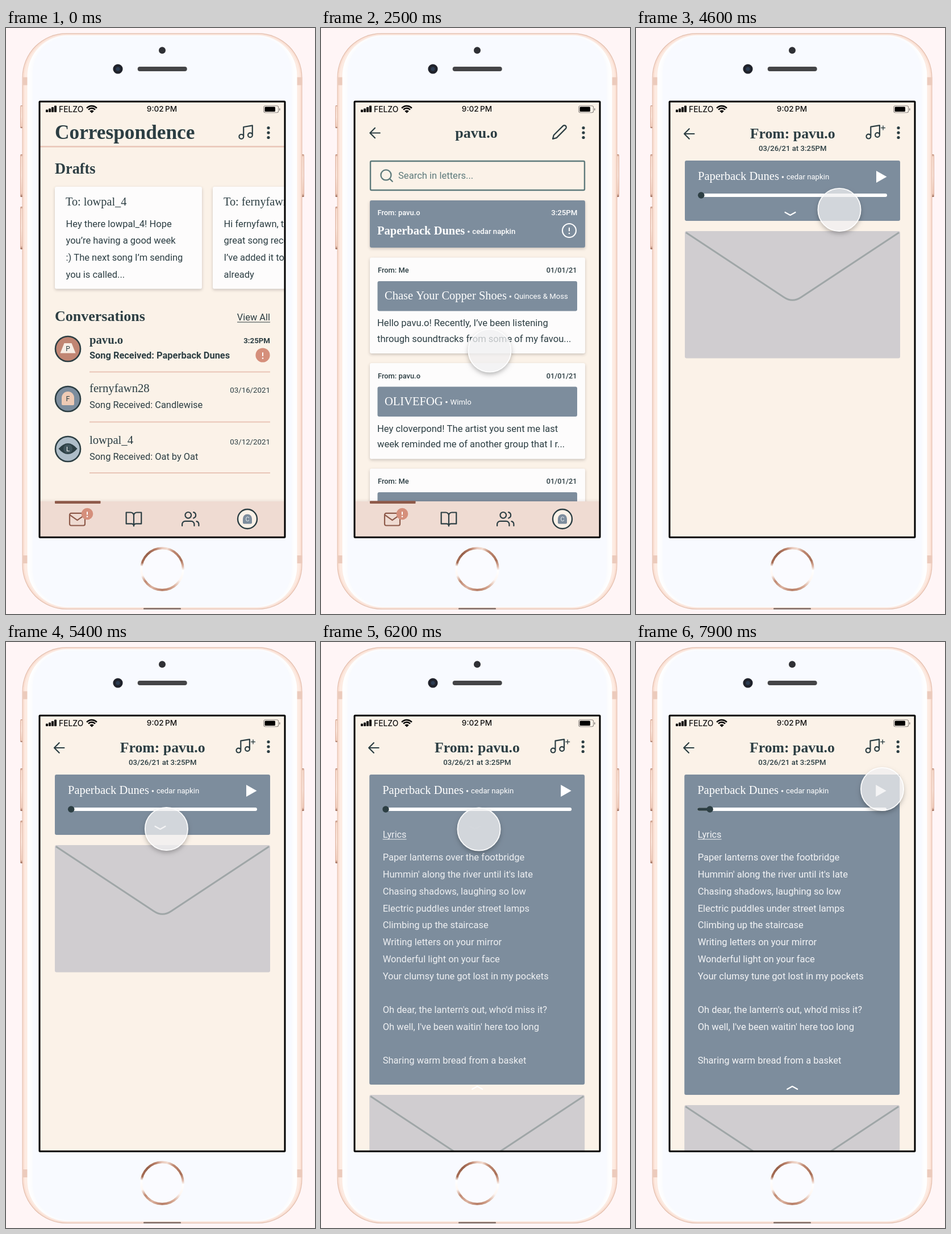
An HTML page with a canvas that plays this animation: 544x1030 px, repeating every 8 s.

```html
<!DOCTYPE html>
<html lang="en">
<head>
<meta charset="utf-8">
<title>Letters prototype</title>
<style>
html, body { margin: 0; width: 100%; height: 100%; overflow: hidden; background: #fff5f6; }
canvas { display: block; width: 544px; height: 1030px; }
</style>
</head>
<body>
<canvas id="stage"></canvas>
<script>
const W = 544, H = 1030, LOOP = 8000, STEP = 100;
const INK = '#2c3e43', CREAM = '#fbf2e8', BLUE = '#7d8d9d', PAPER = '#fdfcfc',
      BLUSH = '#e9c5b7', CORAL = '#d58f7b', BROWN = '#8e5a4a', TEAL = '#5e7a7b', MIST = '#f3f4f6';
const SERIF = '"Liberation Serif", serif', SANS = 'Roboto, sans-serif', UI = 'Inter, sans-serif';
const SONG = 'Paperback Dunes', BAND = 'cedar napkin', FRIEND = 'pavu.o';
const LYRICS = [
  'Paper lanterns over the footbridge',
  "Hummin' along the river until it's late",
  'Chasing shadows, laughing so low',
  'Electric puddles under street lamps',
  'Climbing up the staircase',
  'Writing letters on your mirror',
  'Wonderful light on your face',
  'Your clumsy tune got lost in my pockets',
  '',
  "Oh dear, the lantern's out, who'd miss it?",
  "Oh well, I've been waitin' here too long",
  '',
  'Sharing warm bread from a basket'
];
const ICONS = {
  music: 'M9 18V5l12-2v13M9 18a3 3 0 1 1-6 0a3 3 0 1 1 6 0M21 16a3 3 0 1 1-6 0a3 3 0 1 1 6 0',
  pencil: 'M17 3a2.828 2.828 0 1 1 4 4L7.5 20.5 2 22l1.5-5.5z',
  back: 'M19 12H5M12 19l-7-7 7-7',
  search: 'M19 11a8 8 0 1 1-16 0a8 8 0 1 1 16 0M21 21l-4.35-4.35',
  mail: 'M4 4h16a2 2 0 0 1 2 2v12a2 2 0 0 1-2 2H4a2 2 0 0 1-2-2V6a2 2 0 0 1 2-2zM22 6l-10 7L2 6',
  book: 'M2 3h6a4 4 0 0 1 4 4v14a3 3 0 0 0-3-3H2zM22 3h-6a4 4 0 0 0-4 4v14a3 3 0 0 1 3-3h7z',
  users: 'M17 21v-2a4 4 0 0 0-4-4H5a4 4 0 0 0-4 4v2M23 21v-2a4 4 0 0 0-3-3.87' +
         'M16 3.13a4 4 0 0 1 0 7.75M13 7a4 4 0 1 1-8 0a4 4 0 1 1 8 0'
};

const dpr = window.devicePixelRatio || 1;
function makeLayer(canvas) {
  canvas.width = W * dpr;
  canvas.height = H * dpr;
  const c = canvas.getContext('2d');
  c.scale(dpr, dpr);
  return c;
}
const main = makeLayer(document.getElementById('stage'));
const layer = makeLayer(document.createElement('canvas'));
let g = main;

const clamp = v => Math.max(0, Math.min(1, v));
const span = (t, from, to) => clamp((t - from) / (to - from));
const easeOut = p => Math.sin(p * Math.PI / 2);
const easeInOut = p => p * p * (3 - 2 * p);
const mix = (a, b, p) => a + (b - a) * p;

function text(s, x, y, size, color = INK, weight = 400, font = SANS, align = 'left') {
  g.font = `${weight} ${size}px ${font}`;
  g.fillStyle = color;
  g.textAlign = align;
  g.fillText(s, x, y);
  return g.measureText(s).width;
}
function box(x, y, w, h, r, fill) {
  g.beginPath();
  g.roundRect(x, y, w, h, r);
  g.fillStyle = fill;
  g.fill();
}
function card(x, y, w, h, fill) {
  g.save();
  g.shadowColor = 'rgba(60,50,50,.25)';
  g.shadowBlur = 5 * dpr;
  g.shadowOffsetY = 2 * dpr;
  box(x, y, w, h, 3, fill);
  g.restore();
}
function disc(x, y, r, fill, stroke, width) {
  g.beginPath();
  g.arc(x, y, r, 0, 7);
  if (fill) { g.fillStyle = fill; g.fill(); }
  if (stroke) { g.strokeStyle = stroke; g.lineWidth = width; g.stroke(); }
}
function line(points, color, width) {
  g.beginPath();
  points.forEach(([x, y]) => g.lineTo(x, y));
  g.strokeStyle = color;
  g.lineWidth = width;
  g.stroke();
}
function shape(d, fill) {
  g.fillStyle = fill;
  g.fill(new Path2D(d));
}
function icon(name, x, y, scale, color = INK, width = 2.2) {
  g.save();
  g.translate(x, y);
  g.scale(scale, scale);
  g.lineWidth = width / scale;
  g.lineCap = g.lineJoin = 'round';
  g.strokeStyle = color;
  g.stroke(new Path2D(ICONS[name]));
  g.restore();
}
function kebab(x) {
  [175.5, 184, 192.5].forEach(y => disc(x, y, 2.6, INK));
}
function bang(x, y, h) {
  box(x - 1, y - h, 2, h * 1.15, 1, '#fff');
  disc(x, y + h * .75, 1.3, '#fff');
}
function chevron(x, y, dir) {
  g.beginPath();
  g.moveTo(x - 9, y - 2.5 * dir);
  g.lineTo(x, y + 2.5 * dir);
  g.lineTo(x + 9, y - 2.5 * dir);
  g.strokeStyle = '#fff';
  g.lineWidth = 2.2;
  g.lineCap = g.lineJoin = 'round';
  g.stroke();
  g.lineCap = 'butt';
}
function track(title, artist, x, y, weight) {
  const end = x + text(title, x, y, 20.5, '#fff', weight, SERIF);
  disc(end + 6.5, y - 5, 1.8, '#fff');
  text(artist, end + 13, y - 1, 13.2, '#fff', weight === 700 ? 500 : 400);
}
function arch(x, y, w, h, fill) {
  box(x - w / 2, y - h / 2, w, h, [w / 2, w / 2, 2, 2], fill);
}

function statusBar() {
  [4.5, 6.5, 9, 11.5].forEach((h, i) => box(70 + i * 5, 148 - h, 4, h, 1, '#000'));
  text('FELZO', 93, 147.5, 13.8, '#111', 500, UI);
  g.strokeStyle = '#000';
  g.lineWidth = 2.6;
  [12, 8].forEach(r => {
    g.beginPath();
    g.arc(151, 149, r, -2.4, -.74);
    g.stroke();
  });
  g.beginPath();
  g.moveTo(151, 149.5);
  g.arc(151, 149.5, 5, -2.4, -.74);
  g.fillStyle = '#000';
  g.fill();
  text('9:02\u2009PM', 274.5, 147.3, 13.6, '#111', 500, UI, 'center');
  g.beginPath();
  g.roundRect(453.7, 136.7, 26, 12, 3);
  g.strokeStyle = '#8f8a86';
  g.lineWidth = 1.1;
  g.stroke();
  box(455.5, 138.5, 18.5, 8.5, 1.5, '#000');
  box(481, 141, 1.6, 4, 1, '#8f8a86');
}

function navBar() {
  g.save();
  g.shadowColor = 'rgba(90,60,50,.15)';
  g.shadowBlur = 6 * dpr;
  box(59, 832, 433, 64, 0, '#efdbd2');
  g.restore();
  box(86, 831.3, 80.5, 4.6, 1, BROWN);
  icon('mail', 109.3, 847.5, 1.35, BROWN);
  disc(143, 854, 10.3, CORAL);
  bang(143, 855, 5);
  icon('book', 209, 847.5, 1.33);
  icon('users', 308.8, 847, 1.33);
  disc(425, 863, 17, CREAM, INK, 2.4);
  arch(425, 863, 16, 17, BLUE);
  text('C', 425, 867.3, 11, '#e9edf0', 400, SANS, 'center');
}

function draft(x, name, lines) {
  card(x, 279, 259, 179.5, PAPER);
  text('To: ' + name, x + 19, 312, 20.3, INK, 400, SERIF);
  lines.forEach((s, i) => text(s, x + 19.5, 349.5 + i * 29.8, 16.5));
}
function row(y, name, song, when, fresh) {
  text(name, 147, y, 20.7, INK, fresh ? 700 : 400, SERIF);
  text('Song Received: ' + song, 147, y + (fresh ? 26 : 27.5), 16.4, INK, fresh ? 700 : 400);
  text(when, 465, fresh ? y - .5 : y + .5, 13.3, INK, fresh ? 700 : 400, SANS, 'right');
}
function avatars() {
  const tones = ['#c08573', BLUE, '#aebdc8'];
  tones.forEach((c, i) => disc(109, 564 + i * 88, 22, c, INK, 2.6));
  shape('M102.5 554h13l7 17.5h-27z', '#f7ede5');
  text('P', 109, 567.5, 12, INK, 400, SANS, 'center');
  arch(109, 651, 22, 24, '#efcbb5');
  text('F', 109, 656, 12.5, INK, 400, SANS, 'center');
  shape('M92.5 739.5Q109 720.5 125.5 739.5Q109 758.5 92.5 739.5', INK);
  disc(109, 739.5, 8, '#40545b');
  text('L', 109, 743.7, 11.5, '#fff', 400, SANS, 'center');
}
function homeScreen() {
  text('Correspondence', 86, 195, 35.3, INK, 700, SERIF);
  icon('music', 406.5, 167.5, 1.3);
  kebab(462);
  box(60, 207.3, 431, 2.4, 0, BLUSH);
  text('Drafts', 86, 256, 26.3, INK, 700, SERIF);
  draft(86, 'lowpal_4', ['Hey there lowpal_4! Hope', 'you’re having a good week',
    ':) The next song I’m sending', 'you is called...']);
  draft(364, 'fernyfawn28', ['Hi fernyfawn, thanks for the', 'great song recommendation',
    'I’ve added it to my playlist', 'already']);
  text('Conversations', 86, 515, 26, INK, 700, SERIF);
  text('View All', 465, 514.3, 16.4, INK, 400, SANS, 'right');
  box(407, 516.6, 58, 1, 0, INK);
  avatars();
  row(554.5, FRIEND, SONG, '3:25PM', true);
  row(640, 'fernyfawn28', 'Candlewise', '03/16/2021');
  row(731, 'lowpal_4', 'Oat by Oat', '03/12/2021');
  disc(452, 575, 12.6, CORAL);
  bang(452, 576, 6);
  [604.5, 692.5, 782].forEach(y => box(147, y - 1.1, 318, 2.2, 0, BLUSH));
  navBar();
}

function letterCard(y, from, title, artist, body) {
  card(86, y, 379, 168.5, PAPER);
  text('From: ' + from, 100, y + 26.5, 12.9, INK, 500);
  text('01/01/21', 450.5, y + 26.5, 12.8, INK, 500, SANS, 'right');
  box(99.5, y + 41.5, 351.5, 52.5, 3, BLUE);
  track(title, artist, 112, y + 73.5, 400);
  body.forEach((s, i) => text(s, 99, y + 120.5 + i * 27.5, 16.6));
}
function threadScreen() {
  icon('back', 80, 169.5, 1.25);
  text(FRIEND, 273.5, 192.5, 26, INK, 700, SERIF, 'center');
  icon('pencil', 405.6, 168.5, 1.2);
  kebab(462);
  g.strokeStyle = TEAL;
  g.lineWidth = 2.4;
  g.beginPath();
  g.roundRect(87, 234, 377, 51, 2);
  g.stroke();
  icon('search', 102, 246, 1.13, TEAL, 2.3);
  text('Search in letters...', 136, 265, 16.6, TEAL);
  card(86, 303, 379, 83, BLUE);
  text('From: ' + FRIEND, 99.5, 329, 12.9, '#fff', 500);
  text('3:25PM', 451.5, 329, 13.3, '#fff', 500, SANS, 'right');
  track(SONG, BAND, 99, 363, 700);
  disc(437, 356, 12, null, '#fff', 2.1);
  bang(437, 356.5, 6);
  letterCard(403.5, 'Me', 'Chase Your Copper Shoes', 'Quinces & Moss',
    [`Hello ${FRIEND}! Recently, I’ve been listening`, 'through soundtracks from some of my favou...']);
  letterCard(589, FRIEND, 'OLIVEFOG', 'Wimlo',
    ['Hey cloverpond! The artist you sent me last', 'week reminded me of another group that I r...']);
  letterCard(774.5, 'Me', '', '', []);
  navBar();
}

function letterScreen(t) {
  const open = easeOut(span(t, 5962, 6252));
  const bottom = mix(339, 796, open), env = bottom + 18;
  const played = 27 * Math.max(0, t - 7300) / 1000;
  g.save();
  if (t >= 5900) g.translate(-.8, 0);
  icon('back', 78.7, 171, 1.25);
  text('From: ' + FRIEND, 275.7, 194, 25.8, INK, 700, SERIF, 'center');
  text('03/26/21 at 3:25PM', 275.7, 215.5, 13.2, INK, 500, SANS, 'center');
  icon('music', 401.6, 167.2, 1.3);
  line([[431, 175.5], [439, 175.5]], INK, 1.4);
  line([[435, 171.5], [435, 179.5]], INK, 1.4);
  kebab(462);

  box(86, 233, 379, bottom - 233, 3, BLUE);
  track(SONG, BAND, 109, 267, 400);
  shape('M423 251L441.5 261.5L423 272Z', '#fff');
  box(109, 291, 333, 6, 3, '#fff');
  if (played) box(109, 291.2, 6 + played, 5.6, 3, INK);
  disc(114.7 + played, 294, 5.8, INK);

  box(86, env, 379, 223.5, 3, '#d0cdd0');
  g.strokeStyle = '#9fa6a7';
  g.lineWidth = 3;
  g.beginPath();
  g.moveTo(88, env + 2.5);
  g.lineTo(260, env + 116);
  g.quadraticCurveTo(275.5, env + 126.5, 291, env + 116);
  g.lineTo(463, env + 2.5);
  g.stroke();

  g.globalAlpha = 1 - open;
  chevron(271.5, 326.5, 1);
  g.globalAlpha = open;
  if (open) {
    const w = text('Lyrics', 109.5, 344, 16.3, MIST);
    box(109.5, 346.3, w, 1, 0, MIST);
    LYRICS.forEach((s, i) => text(s, 109.5, 384.3 + i * 29.75, 16.5, MIST));
    chevron(276, 783.5, -1);
  }
  g.restore();
}

function sideButton(x, y, h) {
  const fill = g.createLinearGradient(0, y, 0, y + h);
  [[0, '#b98672'], [.06, '#f9ddd0'], [.5, '#fbe6dc'], [.92, '#f3cfbf'], [1, '#8f5e4c']]
    .forEach(([p, c]) => fill.addColorStop(p, c));
  box(x, y, 6, h, 2, fill);
  box(x < 100 ? x : x + 5, y + 2, 1, h - 4, 0, '#dcae9b');
}
function phone() {
  g.fillStyle = '#fff5f6';
  g.fillRect(0, 0, W, H);
  sideButton(25, 136, 40);
  sideButton(25, 222, 75);
  sideButton(25, 314, 75);
  sideButton(519, 222, 75);
  box(28.5, 9, 493, 1013, 78, '#e3bfae');
  box(29.7, 10.2, 490.6, 1010.6, 77, '#fbe0d4');
  box(32.5, 12, 485, 1007, 75, '#fdebe2');
  [86.5, 927].forEach(y => [29, 512].forEach(x => box(x, y, 9.5, 14, 0, '#eccbbc')));
  box(37.5, 13, 475, 1005, 71, '#ffffff');
  g.save();
  g.shadowColor = '#f3f6fd';
  g.shadowBlur = 8 * dpr;
  box(48, 16, 454, 999, 62, '#f8faff');
  g.restore();
  box(242, 1019.5, 66, 2.5, 1, '#7d6a63');

  disc(275, 39.3, 6, '#2f3035');
  disc(197, 72, 8.6, '#20222b');
  disc(197, 72, 3.6, '#2c3c52');
  box(231.7, 68, 87, 8, 4, '#444447');

  const ring = g.createConicGradient(-Math.PI / 2, 275, 951);
  [[0, '#e9c9bb'], [.04, '#f3ddd2'], [.09, '#c08a73'], [.18, '#a86f57'], [.23, '#e0b9a8'],
   [.26, '#ffffff'], [.34, '#fdf6f2'], [.41, '#d6a893'], [.5, '#b57c64'], [.58, '#dcb3a1'],
   [.65, '#c08a73'], [.7, '#fff8f4'], [.77, '#ffffff'], [.8, '#a86f57'], [.88, '#97604a'],
   [.95, '#b98069'], [1, '#e9c9bb']]
    .forEach(([p, c]) => ring.addColorStop(p, c));
  disc(275, 951, 36.8, '#fafbff', ring, 4);
}

// Cursor stops: time, x, y
const STOPS = [[200, 600, 650], [950, 297, 567], [2500, 297, 567], [3400, 322, 342.5],
  [4100, 322, 342.5], [4600, 358, 319.5], [4800, 358, 319.5], [5500, 278, 329],
  [6400, 278, 329], [7050, 433.5, 258.5], [LOOP, 433.5, 258.5]];
const PRESSES = [[1050, 1250], [3600, 3850], [5700, 5950], [7150, 7350]];

function cursor(t) {
  if (t < STOPS[0][0]) return;
  const i = STOPS.findIndex(s => s[0] > t);
  const [t0, x0, y0] = STOPS[i - 1], [t1, x1, y1] = STOPS[i];
  const p = easeInOut(span(t, t0, t1));
  const x = mix(x0, x1, p), y = mix(y0, y1, p);
  const pressed = PRESSES.some(([a, b]) => t >= a && t < b);
  if (!pressed) {
    g.save();
    g.beginPath();
    g.rect(0, 0, W, H);
    g.arc(x, y, 38, 0, 7);
    g.clip('evenodd');
    g.shadowColor = 'rgba(0,0,0,.3)';
    g.shadowBlur = 9 * dpr;
    g.shadowOffsetY = 4 * dpr;
    disc(x, y, 37.5, '#fff');
    g.restore();
  }
  disc(x, y, 37.6, pressed ? 'rgba(245,245,247,.42)' : 'rgba(241,241,242,.74)',
    'rgba(255,255,255,.92)', pressed ? 1.2 : 1.9);
}

function screen(draw, t, alpha) {
  if (alpha <= 0) return;
  g = layer;
  g.fillStyle = CREAM;
  g.fillRect(0, 0, W, H);
  draw(t);
  statusBar();
  g = main;
  g.globalAlpha = alpha;
  g.drawImage(layer.canvas, 0, 0, W, H);
  g.globalAlpha = 1;
}
function render(t) {
  g = main;
  phone();
  g.save();
  g.beginPath();
  g.rect(59, 129, 432, 766);
  g.clip();
  const toThread = easeOut(span(t, 1150, 1450)), toLetter = easeOut(span(t, 3800, 4100));
  if (toThread < 1) screen(homeScreen, t, 1);
  if (toLetter < 1) screen(threadScreen, t, toThread);
  screen(letterScreen, t, toLetter);
  g.restore();
  g.strokeStyle = '#000';
  g.lineWidth = 3;
  g.beginPath();
  g.roundRect(59, 129.2, 432, 766, 1);
  g.stroke();
  cursor(t);
}

const start = performance.now();
function tick() {
  const t = (performance.now() - start) % LOOP;
  render(Math.floor(t / STEP) * STEP);
  requestAnimationFrame(tick);
}
tick();
</script>
</body>
</html>
```
